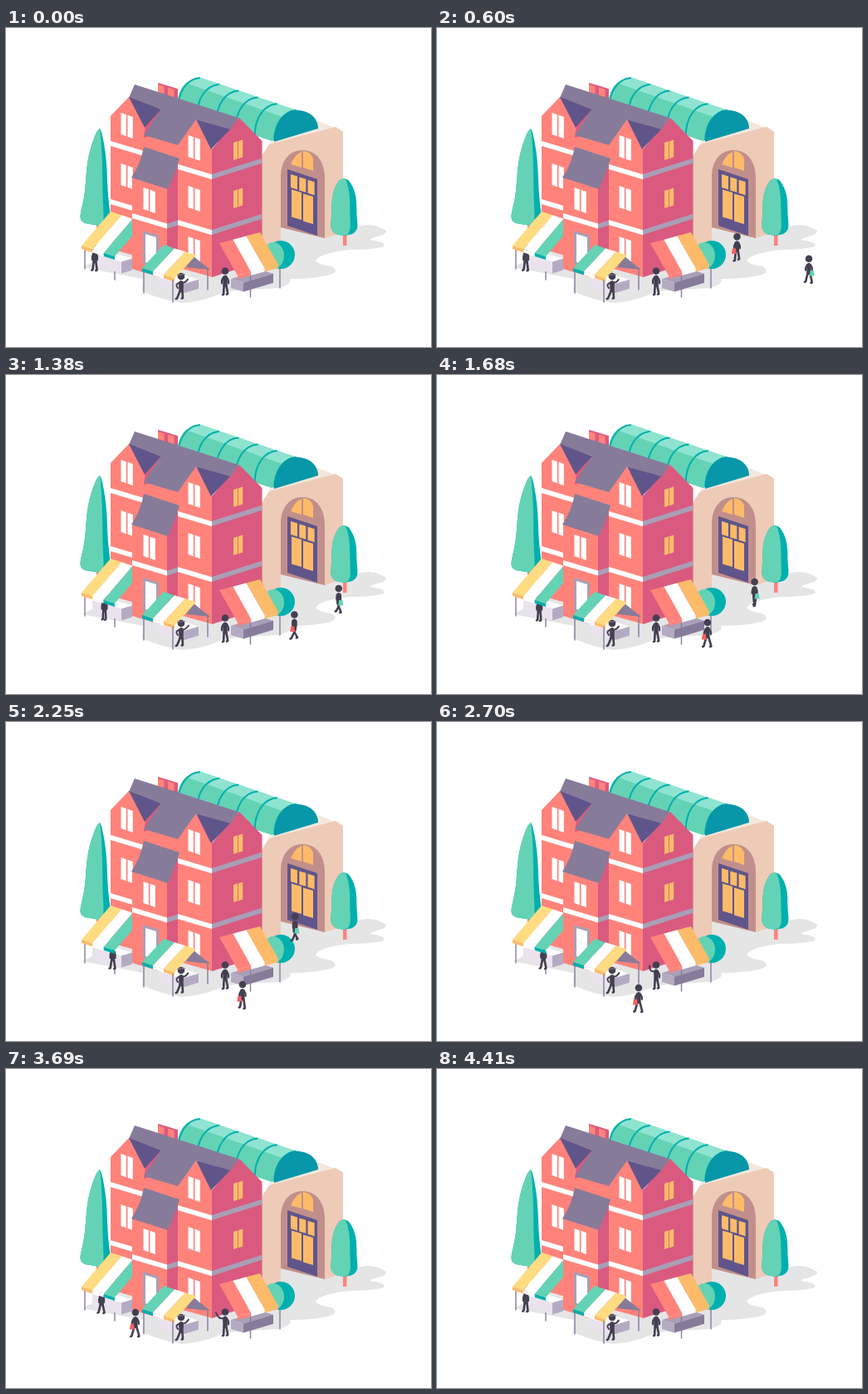
An HTML page for the animation above (4.44 s loop, 512x384 px).

```html
<!DOCTYPE html>
<html lang="en">
<head>
<meta charset="utf-8">
<title>Market house</title>
<style>
html, body { margin: 0; width: 100%; height: 100%; overflow: hidden; background: #fff; }
svg { display: block; width: 512px; height: 384px; }
</style>
</head>
<body>
<svg id="stage" viewBox="0 0 512 384" xmlns="http://www.w3.org/2000/svg"></svg>
<script>
const NS = 'http://www.w3.org/2000/svg';
const LOOP = 4440;
const FRONT = 0.3, SIDE = -0.317;
const stage = document.getElementById('stage');
const C = {
  coral: '#ff837b', pink: '#da5a7f', roof: '#877b9a', slate: '#60558a', band: '#a99fb7',
  white: '#ffffff', amber: '#fdbb6a', wall: '#edcbb7', cream: '#f4e7db', arch: '#c18f8b',
  mint: '#64d3b5', light: '#8fe4d1', teal: '#00b0ae', deep: '#0797a8',
  sun: '#ffdc82', shade: '#e5e5e6', pale: '#eae3ee', lilac: '#b4abc3', ink: '#443f50'
};

function add(tag, attrs, parent = stage) {
  const el = document.createElementNS(NS, tag);
  for (const k in attrs) el.setAttribute(k, attrs[k]);
  parent.appendChild(el);
  return el;
}
const poly = (points, fill) => add('polygon', { points, fill });
const path = (d, fill) => add('path', { d, fill });
const line = (d, stroke, width, parent = stage) => add('path', {
  d, stroke, fill: 'none', 'stroke-width': width,
  'stroke-linecap': 'round', 'stroke-linejoin': 'round'
}, parent);
const post = (x, y, h = 26) => line(`M${x},${y}v${h}`, C.roof, 1.4);

// Upright panel lying on a sloped wall
function pane(x, y, w, h, fill, slope = FRONT) {
  const d = w * slope;
  poly([x, y, x + w, y + d, x + w, y + h + d, x, y + h], fill);
}
function pair(x, y) {
  for (const k of [0, 8]) pane(x + k, y + k * 0.35, 6.3, 26, C.white, 0.35);
}

// Box seen from its front corner: w runs right and down, d right and up
function box(x, y, w, d, h, top, left, right) {
  const m = y + w * FRONT, r = d * FRONT;
  poly([x, y, x + w, m, x + w + d, m - r, x + d, y - r], top);
  pane(x, y, w, h, left);
  pane(x + w, m, d, h, right, -FRONT);
}

// Striped cloth: top corner, vector along the stripes' ends, vector down the slope
function awning([x, y], [ax, ay], [dx, dy], colors) {
  const n = colors.length, w = ax / n, s = ay / n;
  colors.forEach((fill, i) => {
    const px = x + w * i, py = y + s * i;
    poly([px, py, px + w, py + s, px + w + dx, py + s + dy, px + dx, py + dy], fill);
    const edge = { [C.mint]: C.teal, [C.sun]: C.amber }[fill] || fill;
    pane(px + dx, py + dy, w, 4, edge, ay / ax);
  });
}

// Foliage outline: width grows downward with a wobble, then rounds off
function foliage(cx, top, h, left, right, grow, round, fill) {
  const pts = [], n = 40;
  const half = u => u ** grow * (1 + 0.1 * Math.sin(7 * u)) * Math.sqrt(1 - u ** round);
  for (let i = 0; i <= n; i++) pts.push([cx + right * half(i / n), top + h * i / n]);
  for (let i = n; i >= 0; i--) pts.push([cx - left * half(i / n), top + h * i / n]);
  poly(pts.join(' '), fill);
}

function ground() {
  path('M330,236L384,252L424,239Q442,233 458,244Q459,249 444,252Q434,255 444,256Q458,258 455,263' +
    'Q442,267 414,267Q378,271 373,280Q376,285 392,287Q402,293 391,297Q372,302 342,302' +
    'Q346,308 328,313L240,318L245,300Z', C.shade);
  path('M92,288L165,302L164,317Q190,328 212,331Q240,329 262,318L300,313L250,290L130,268Z', C.shade);
}

function hall() {
  path('M206,98Q206,61 235,60L350,99L376,120L323,137Z', C.mint);
  path('M219,67Q226,60 235,60L350,99Q341,99 333,107Z', C.light);
  for (let i = 0; i <= 5; i++) {
    add('path', {
      d: 'M323,137C323,117 333,100 350,99', fill: 'none', stroke: C.teal, 'stroke-width': 2,
      transform: `translate(${-23.2 * i} ${-7.8 * i})`
    });
  }
  poly('316,138 376,112 406,124 340,150', C.cream);
  path('M323,137C323,117 333,99 350,99C366,99 376,109 376,121Z', C.deep);
  poly('306,157 317,140 397,119 406,125 406,246 384,253 331,240 331,264 306,270', C.wall);
  path('M331,240V179C331,158 343,147 357,147C374,147 384,161 384,181V253Z', C.arch);
  path('M343,165Q347,153 356,149V168L343,164ZM358,148Q367,149 370,157V172L358,168Z', C.amber);
  pane(339, 170, 36, 68, C.slate, 0.33);
  for (let i = 0; i < 3; i++) pane(343 + 10.3 * i, 176 + 3.4 * i, 8, 16, C.amber);
  for (let i = 0; i < 2; i++) pane(344 + 14 * i, 194.5 + 5 * i, 12, 33, C.amber);
}

function trees() {
  pane(109, 232, 9, 18, C.coral, 0);
  foliage(113, 121, 117, 26, 14, 0.6, 24, C.teal);
  foliage(113, 121, 117, 26, 5, 0.6, 24, C.mint);
  pane(406, 246, 4.5, 16, C.coral, 0);
  foliage(407, 181, 69, 20, 21, 0.4, 8, C.teal);
  foliage(407, 181, 69, 20, 10, 0.4, 8, C.mint);
  add('ellipse', { cx: 331, cy: 273, rx: 17, ry: 17, fill: C.teal });
  add('ellipse', { cx: 322, cy: 274, rx: 13, ry: 16, fill: C.mint });
}

function house() {
  for (const k of [0, 12]) {
    pane(183 + k, 66 + k * 0.3, 12, 16, C.pink);
    pane(183 + k, 68 + k * 0.3, 7.5, 15, C.coral);
  }
  poly('126,106 148,83 187,98 229,110 249,146 249,300 126,266', C.coral);
  poly('248,146 270,119 281,108 308.5,136 308.5,281 248,300', C.pink);
  for (let i = 0; i < 2; i++) {
    pane(126, 136 + 70 * i, 39, 6, C.white);
    pane(207, 164 + 67 * i, 41, 6, C.white);
    pane(248, 176 + 67 * i, 60.5, 6, C.band, SIDE);
    pair(138.5, 102 + 61 * i);
    for (const k of [0, 6]) pane(274 + k, 138 + 58 * i - k * 0.3, 5.2, 21, C.amber, SIDE);
  }
  poly('187,98 168,119 166,132 180,128', C.pink);
  poly('155,68 280,108 270,123 229,110 207,141 166,129 187,98 148,84', C.roof);
  poly('148,83 187,98 167,120', C.slate);
  poly('229,110 270,122 247,146', C.slate);
  for (let i = 0; i < 3; i++) pair(219.5, 129 + 61 * i);
}

function bay() {
  pane(152, 180, 42, 110, C.coral);
  poly('194,193 207,158 207,291 194,299', C.pink);
  pane(152, 223, 42, 6, C.white);
  pane(194, 235.6, 13, 6, C.band, SIDE);
  path('M166,143L209,157Q204,174 195,194L151,180Q162,164 166,143Z', C.roof);
  pair(165.5, 192);
  pane(165, 244, 19, 40, C.band);
  pane(168, 248, 13, 34, C.white);
}

function midStall() {
  post(166, 293);
  box(183, 300, 29, 20, 11, C.white, C.pale, C.lilac);
  post(243, 289);
  poly('226,275 246,291 217,288', C.roof);
  awning([190, 261], [39, 12.5], [-26, 28], [C.mint, C.white, C.sun]);
  post(201, 304);
}
function rightStall() {
  box(271, 302, 15, 36, 11, C.band, C.lilac, C.roof);
  post(330, 290, 23);
  post(294.5, 299, 25);
  awning([257, 259], [43, -14], [19, 39], []);
  awning([257, 259], [49, -13], [22, 39], [C.coral, C.white, C.amber]);
}

function figure(bagColor) {
  const g = add('g', {});
  const limb = w => line('', C.ink, w, g);
  const f = { armL: limb(2), armR: limb(2), legL: limb(2.6), legR: limb(2.6), g };
  add('path', { d: 'M-3,7Q0,3 3,7L2.5,19H-2.5Z', fill: C.ink }, g);
  add('circle', { r: 4.3, fill: C.ink }, g);
  if (bagColor) f.bag = add('path', { d: 'M-2,-3H2L3,3.5H-3Z', fill: bagColor }, g);
  return f;
}
// Feet and hands are points below the head; each arm also has an elbow
function pose(f, x, y, feet, arms, alpha = 1) {
  f.g.setAttribute('transform', `translate(${x.toFixed(2)} ${y.toFixed(2)})`);
  f.g.setAttribute('opacity', alpha);
  [f.legL, f.legR].forEach((leg, i) => {
    const [fx, fy] = feet[i], hip = i ? 1.2 : -1.2;
    leg.setAttribute('d', `M${hip},17Q${hip + fx * 0.35},22 ${fx},${fy}l-1.2,.5`);
  });
  [f.armL, f.armR].forEach((arm, i) => {
    const [hx, hy, ex = hx * 1.2, ey = 11] = arms[i];
    arm.setAttribute('d', `M${i ? 2 : -2},7.5Q${ex},${ey} ${hx},${hy}`);
  });
}

const ramp = (t, a, b) => Math.max(0, Math.min(1, (t - a) / (b - a)));
const ease = k => k * k * (3 - 2 * k);

// Position along [time, x, y] points
function along(keys, t) {
  let i = 0;
  while (i < keys.length - 2 && t > keys[i + 1][0]) i++;
  const [a, b] = [keys[i], keys[i + 1]], k = ramp(t, a[0], b[0]);
  return [a[1] + (b[1] - a[1]) * k, a[2] + (b[2] - a[2]) * k];
}

function walk(f, x, y, t, alpha, bagSide) {
  const a = Math.PI * (t - 1680) / 251;
  const s = Math.cos(a), lift = 2 * Math.sin(a);
  const feet = [[-4.5 * s, 28.5 - Math.max(0, lift)], [4.5 * s, 28.5 - Math.max(0, -lift)]];
  const arms = [[-3 - s, 14], [3 + s, 14]];
  pose(f, x, y, feet, arms, alpha);
  const [hx, hy] = arms[bagSide];
  f.bag.setAttribute('transform', `translate(${hx} ${hy + 3})`);
}

const shopperPath = [[320, 357, 235], [1080, 369, 279], [2250, 285, 316],
  [2700, 243, 320], [3690, 156, 293], [4250, 112, 277]];

ground();
hall();
trees();
const visitor = figure(C.mint);
house();
post(131, 277);
box(104, 271, 35, 13, 14, C.white, C.pale, C.lilac);
const seller = figure();
post(95, 264);
awning([126, 221], [40, 13], [-35, 41], [C.sun, C.white, C.mint]);
bay();
midStall();
rightStall();
const waver = figure();
const vendor = figure();
line('M-4.5,-1.500L4.5,-2.500', C.roof, 1, vendor.g);
const shopper = figure('#f4605f');

function draw(t) {
  const v = t - 1080;
  walk(visitor, 419 - 0.0605 * v, 265 - 0.0265 * v, t + 120,
    ramp(t, 440, 580) * (1 - ramp(t, 2300, 2540)), 1);

  const [x, y] = along(shopperPath, t);
  walk(shopper, x, y, t, ramp(t, 320, 460) * (1 - ramp(t, 3950, 4220)), 0);

  const shift = 22 * Math.sin(Math.PI * ramp(t, 570, 4300)) ** 1.4;
  const step = Math.sin(shift);
  pose(seller, 107 + shift, 264 + shift * 0.23, [[-2.5 - step, 27], [2.5 + step, 27.5]], [[-3, 15], [3, 15]]);

  const nod = Math.sin(t / LOOP * Math.PI * 8);
  pose(vendor, 211, 299, [[-5, 26.5], [2, 26]], [[-4, 14, -8, 10], [8 + nod, 3.5 - nod, 5, 8]]);

  const up = ease(ramp(t, 2350, 2650)) * (1 - ease(ramp(t, 3900, 4380)));
  const sway = ease(ramp(t, 2750, 3100)) * 3 * up;
  pose(waver, 264, 292.5, [[-1.8, 28], [3.2, 27.5]],
    [[-4 - 4 * up - sway, 15 - 14 * up, -5 - 3 * up, 11 - 2 * up], [4, 15]]);
}

function tick() {
  draw(performance.now() % LOOP);
  requestAnimationFrame(tick);
}
tick();
</script>
</body>
</html>
```
